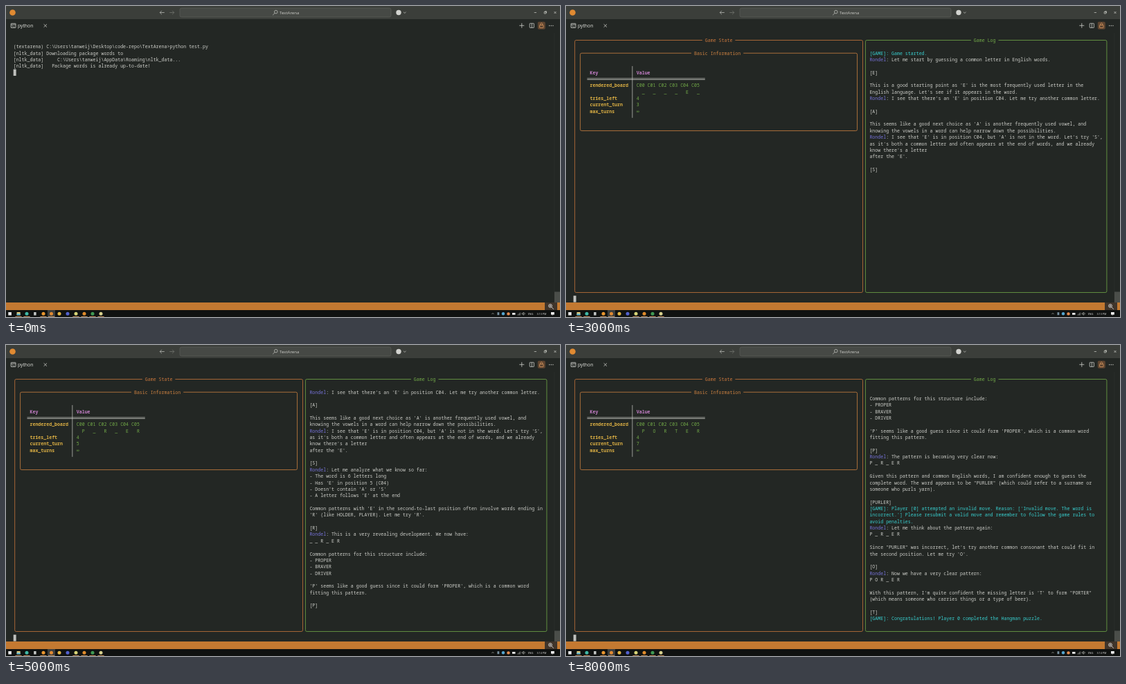
These frames come from a looping animation (800x450 px, 9000 ms). An HTML page with a canvas:

```html
<!DOCTYPE html>
<html lang="en">
<head>
<meta charset="utf-8">
<title>Terminal word game</title>
<style>
html, body { margin: 0; width: 100%; height: 100%; overflow: hidden; background: #232724; }
canvas { display: block; width: 800px; height: 450px; }
</style>
</head>
<body>
<canvas id="stage" width="800" height="450"></canvas>
<script>
const ctx = document.getElementById('stage').getContext('2d');
const MONO = '"Noto Sans Mono", "DejaVu Sans Mono", monospace';
const SANS = '"Open Sans", "Noto Sans", sans-serif';
const CELL = 3.96, LINE = 9.36, LEFT = 10.7, TOP = 49.5;
const INK = '#cdcec9', ORANGE = '#c8763c', GREEN = '#72aa48', CYAN = '#38cfcf';
const PLAYER = 'Rondel';

const intro = String.raw`(textarena) C:\Users\tanweij\Desktop\code-repo\TextArena>python test.py
[nltk_data] Downloading package words to
[nltk_data]     C:\Users\tanweij\AppData\Roaming\nltk_data...
[nltk_data]   Package words is already up-to-date!`.split('\n');

const log = `[GAME]: Game started.
Rondel: Let me start by guessing a common letter in English words.

[E]

This is a good starting point as 'E' is the most frequently used letter in the
English language. Let's see if it appears in the word.
Rondel: I see that there's an 'E' in position C04. Let me try another common letter.

[A]

This seems like a good next choice as 'A' is another frequently used vowel, and
knowing the vowels in a word can help narrow down the possibilities.
Rondel: I see that 'E' is in position C04, but 'A' is not in the word. Let's try 'S',
as it's both a common letter and often appears at the end of words, and we already
know there's a letter
after the 'E'.

[S]
Rondel: Let me analyze what we know so far:
- The word is 6 letters long
- Has 'E' in position 5 (C04)
- Doesn't contain 'A' or 'S'
- A letter follows 'E' at the end

Common patterns with 'E' in the second-to-last position often involve words ending in
'R' (like HOLDER, PLAYER). Let me try 'R'.

[R]
Rondel: This is a very revealing development. We now have:
_ _ R _ E R

Common patterns for this structure include:
- PROPER
- BRAVER
- DRIVER

'P' seems like a good guess since it could form 'PROPER', which is a common word
fitting this pattern.

[P]
Rondel: The pattern is becoming very clear now:
P _ R _ E R

Given this pattern and common English words, I am confident enough to guess the
complete word. The word appears to be "PURLER" (which could refer to a surname or
someone who purls yarn).

[PURLER]
[GAME]: Player [0] attempted an invalid move. Reason: ['Invalid move. The word is
incorrect.'] Please resubmit a valid move and remember to follow the game rules to
avoid penalties.
Rondel: Let me think about the pattern again:
P _ R _ E R

Since "PURLER" was incorrect, let's try another common consonant that could fit in
the second position. Let me try 'O'.

[O]
Rondel: Now we have a very clear pattern:
P O R _ E R

With this pattern, I'm quite confident the missing letter is 'T' to form "PORTER"
(which means someone who carries things or a type of beer).

[T]
[GAME]: Congratulations! Player 0 completed the Hangman puzzle.`.split('\n');

// One entry per second: first and last visible log line, board, tries, turn
const states = [
  null,
  { from: 0, to: 6, board: '____E_', tries: 6, turn: 1 },
  { from: 0, to: 12, board: '____E_', tries: 5, turn: 2 },
  { from: 0, to: 18, board: '____E_', tries: 4, turn: 3 },
  { from: 0, to: 28, board: '__R_ER', tries: 4, turn: 4 },
  { from: 7, to: 40, board: 'P_R_ER', tries: 4, turn: 5 },
  { from: 17, to: 51, board: 'P_R_ER', tries: 4, turn: 6 },
  { from: 23, to: 58, board: 'POR_ER', tries: 4, turn: 7 },
  { from: 31, to: 66, board: 'PORTER', tries: 4, turn: 7 }
];

const colX = c => LEFT + c * CELL;
const midX = c => colX(c + 0.5);
const rowY = r => TOP + r * LINE;

// Text is set large and scaled down to keep fractional advances
function type(s, x, y, size, color, family, weight = 400) {
  ctx.save();
  ctx.translate(x, y);
  ctx.scale(0.1, 0.1);
  ctx.font = `${weight} ${size * 10}px ${family}`;
  ctx.fillStyle = color;
  ctx.fillText(s, 0, 0);
  ctx.restore();
}
const put = (s, col, row, color = INK, weight = 400) =>
  type(s, colX(col), rowY(row) + 2.3, 6.6, color, MONO, weight);

function rect(x, y, w, h, color) {
  ctx.fillStyle = color;
  ctx.fillRect(x, y, w, h);
}
function round(x, y, w, h, r, fill, stroke) {
  ctx.beginPath();
  ctx.roundRect(x, y, w, h, r);
  if (fill) { ctx.fillStyle = fill; ctx.fill(); }
  if (stroke) { ctx.strokeStyle = stroke; ctx.stroke(); }
}
function dot(x, y, r, color) {
  ctx.beginPath();
  ctx.arc(x, y, r, 0, 7);
  ctx.fillStyle = color;
  ctx.fill();
}
function ring(x, y, r, color) {
  ctx.beginPath();
  ctx.arc(x, y, r, 0, 7);
  ctx.strokeStyle = color;
  ctx.stroke();
}
function path(color, ...pts) {
  ctx.beginPath();
  for (let i = 0; i < pts.length; i += 2) ctx.lineTo(pts[i], pts[i + 1]);
  ctx.strokeStyle = color;
  ctx.stroke();
}
function cross(x, y, r, color) {
  path(color, x - r, y - r, x + r, y + r);
  path(color, x - r, y + r, x + r, y - r);
}
function arrow(x, y, dir, color) {
  path(color, x - 3.3, y, x + 3.3, y);
  path(color, x + dir * 0.6, y - 2.7, x + dir * 3.3, y, x + dir * 0.6, y + 2.7);
}
function lens(x, y, r, dx, color) {
  ring(x, y, r, color);
  path(color, x + dx * r * 0.7, y + r * 0.7, x + dx * r * 2, y + r * 2);
}
const cursor = row => rect(colX(0), rowY(row) - 4.7, CELL, LINE, '#bfc0bd');

function panel(c1, r1, c2, r2, title, start, color) {
  const x1 = midX(c1), x2 = midX(c2), y1 = rowY(r1), y2 = rowY(r2), r = 2;
  ctx.lineWidth = 0.8;
  ctx.strokeStyle = color;
  ctx.beginPath();
  ctx.moveTo(colX(start - 1), y1);
  ctx.arcTo(x1, y1, x1, y2, r);
  ctx.arcTo(x1, y2, x2, y2, r);
  ctx.arcTo(x2, y2, x2, y1, r);
  ctx.arcTo(x2, y1, x1, y1, r);
  ctx.lineTo(colX(start + title.length + 1), y1);
  ctx.stroke();
  put(title, start, r1, color);
}

function titleBar() {
  rect(0, 0, 800, 19, '#3b3e3a');
  ctx.lineWidth = 0.7;
  dot(9.5, 9.5, 4.3, '#e08a32');
  arrow(225.5, 9.5, -1, '#c6c7c3');
  arrow(239.5, 9.5, 1, '#777a75');
  round(251, 3, 305, 13, 2.5, '#464945', '#5c5f5a');
  lens(389.8, 8.6, 2.3, -1, INK);
  type('TextArena', 395, 11.8, 6.1, INK, SANS);
  dot(567, 9.5, 3.7, '#d2d3cf');
  path(INK, 574, 8.7, 575.8, 10.4, 577.6, 8.7);
  path(INK, 762.7, 9.5, 766, 9.5);
  round(777.2, 8.5, 2.5, 2.5, 0, null, INK);
  path(INK, 778.2, 8.4, 778.2, 7.7, 780.5, 7.7, 780.5, 10, 779.8, 10);
  cross(793, 9.5, 1.5, INK);
}

function tabs() {
  ctx.lineWidth = 0.8;
  round(7.2, 25.3, 6.8, 6.2, 0.5, null, INK);
  path(INK, 7.2, 27, 14, 27);
  path(INK, 8.6, 28.2, 9.7, 29.2, 8.6, 30.2);
  path(INK, 10.5, 30, 12.5, 30);
  type('python', 17, 31.2, 6.8, '#e4e5e0', SANS);
  cross(56.8, 28.5, 2.2, INK);
  path(INK, 741.3, 28.3, 748.3, 28.3);
  path(INK, 744.8, 24.8, 744.8, 31.8);
  round(756.2, 25.2, 6.2, 6.2, 0.5, null, INK);
  path(INK, 759.3, 25.2, 759.3, 31.4);
  round(767.8, 22.8, 11, 11, 2, '#5d4430');
  round(770.6, 27.6, 5.4, 4, 0.5, null, '#dc9b61');
  path('#dc9b61', 771.8, 27.6, 771.8, 25.6, 772.6, 24.8, 774, 24.8, 774.8, 25.6, 774.8, 27.6);
  for (const x of [784.7, 787.3, 789.9]) dot(x, 28.5, 0.65, INK);
}

function taskbar(clock) {
  rect(0, 440, 800, 10, '#101211');
  rect(60, 440, 11, 10, '#3c3e3d');
  rect(3.3, 443, 4.6, 4.6, '#e8e8e8');
  rect(15.6, 443, 5, 4.4, '#e5cf7c');
  rect(15.6, 445.2, 5, 2.2, '#59b6d8');
  const apps = [[30, '#3fb8a6'], [54, '#e9962e'], [65.5, '#e08a32'], [77, '#e3b744'],
    [89, '#5362cf'], [101, '#d5d276'], [113, '#df8b2b'], [125, '#3f9a53'], [137, '#d6cf8c']];
  for (const [x, color] of apps) dot(x, 445.2, 2.5, color);
  rect(40.2, 443, 3.4, 4.6, '#c5c9c8');
  for (const x of [18, 30, 54, 65.5, 101, 113, 125, 137]) rect(x - 4.6, 449, 9.2, 1, '#b98a5c');
  ctx.lineWidth = 0.6;
  path(INK, 701.4, 446, 703, 444.4, 704.6, 446);
  rect(709.5, 443.2, 2.8, 4, '#7890a0');
  dot(718, 445.3, 2.2, '#55a7d2');
  dot(725.5, 445.4, 2.2, '#e58b50');
  rect(731, 444, 4.5, 2.8, '#e6e6e6');
  for (let i = 0; i < 4; i++) rect(738.6 + i * 1.1, 446.5 - i, 0.7, 1 + i, '#9b9d9b');
  path(INK, 745.2, 444.5, 746.2, 444.5, 747.5, 443.2, 747.5, 447.2, 746.2, 446, 745.2, 446, 745.2, 444.5);
  path(INK, 748.7, 443.9, 749.4, 445.2, 748.7, 446.5);
  type('ENG', 753.8, 446.6, 3.7, '#e2e2e2', SANS);
  type(clock, 766.4, 446.6, 3.75, '#e2e2e2', SANS);
  rect(787, 443, 4.8, 3.6, '#eeeeee');
  rect(788.5, 446.4, 1.2, 1, '#eeeeee');
}

function frame(second) {
  rect(0, 0, 800, 450, '#232724');
  titleBar();
  tabs();
  rect(791.6, 39, 0.7, 390, '#2d312d');
  rect(792, 413.5, 8, 15.5, '#4b4e4a');
  rect(0, 429, 800, 11, '#c37931');
  rect(778, 429, 18, 11, '#40352b');
  ctx.lineWidth = 0.8;
  lens(786, 433.9, 2.4, 1, '#eeeeee');
  path('#eeeeee', 784.8, 433.9, 787.2, 433.9);
  path('#eeeeee', 786, 432.7, 786, 435.1);
  taskbar(second < 5 ? '3:13 PM' : '3:14 PM');
}

function gameState({ board, tries, turn }) {
  panel(0, 0, 105, 39, 'Game State', 48, ORANGE);
  panel(2, 2, 103, 14, 'Basic Information', 44, '#cc8140');
  put('Key', 6, 5, '#c67fc9', 700);
  put('Value', 23, 5, '#c67fc9', 700);
  ctx.lineWidth = 0.7;
  path(INK, midX(21), rowY(4), midX(21), rowY(12));
  for (const d of [-0.85, 0.85]) path(INK, colX(5), rowY(6) + d, colX(48), rowY(6) + d);
  ['rendered_board', '', 'tries_left', 'current_turn', 'max_turns']
    .forEach((s, i) => put(s, 6, 7 + i, '#deb144', 700));
  ['C00 C01 C02 C03 C04 C05', '  ' + [...board].join('   '), tries, turn, '∞']
    .forEach((s, i) => put(String(s), 23, 7 + i, GREEN));
}

function gameLog({ from, to }) {
  panel(106, 0, 194, 39, 'Game Log', 146, GREEN);
  let color = INK;
  for (let i = from; i <= to; i++) {
    const s = log[i], row = 2 + i - from;
    const spoken = s.startsWith(PLAYER);
    if (s.startsWith('[GAME]')) color = CYAN;
    else if (spoken) color = INK;
    if (spoken) {
      put(PLAYER, 108, row, '#7672d8');
      put(s.slice(PLAYER.length), 108 + PLAYER.length, row, color);
    } else put(s, 108, row, color);
  }
}

function draw() {
  const second = Math.floor(performance.now() % 9000 / 1000);
  const state = states[second];
  frame(second);
  if (state) {
    gameState(state);
    gameLog(state);
    cursor(40);
  } else {
    intro.forEach((s, i) => put(s, 0, 1 + i));
    cursor(5);
  }
  requestAnimationFrame(draw);
}
draw();
</script>
</body>
</html>
```
